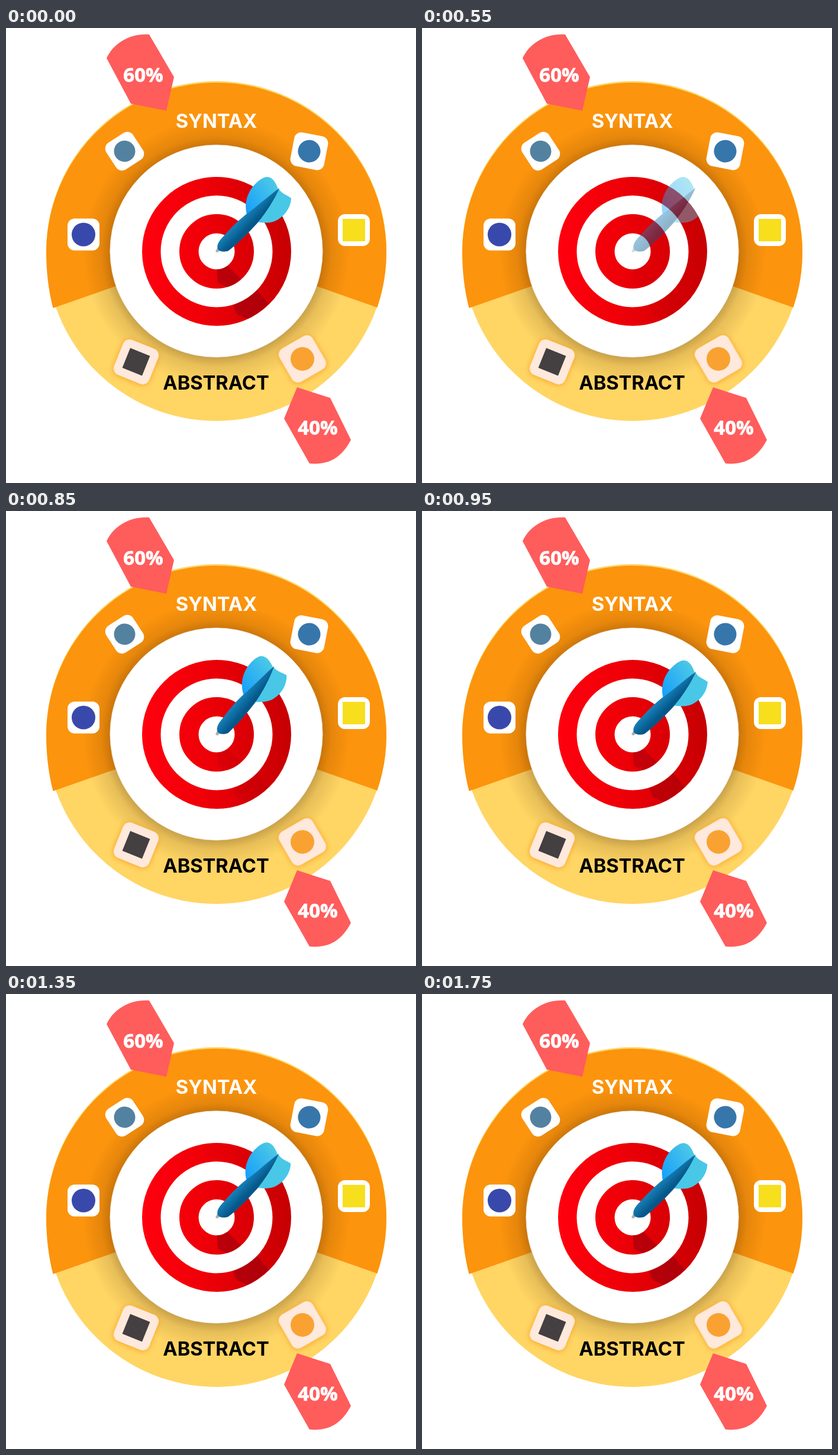
An HTML page for the animation above (1800 ms loop, 693 by 770 pixels).

```html
<!DOCTYPE html>
<html lang="en">
<head>
<meta charset="utf-8">
<title>Syntax and abstract</title>
<style>
  html, body { margin: 0; width: 100%; height: 100%; overflow: hidden; background: #fff; }
  svg { display: block; width: 693px; height: 770px; }
  text { font: 700 32.7px Inter, sans-serif; text-anchor: middle; }
  .share text { font: 700 33px "Open Sans", sans-serif; fill: #fff; stroke: #fff; stroke-width: .8; }
  .share path { fill: #ff5c5c; }
  .glow { fill: #fee9dc; filter: drop-shadow(0 1px 5px #f9a01e); }
</style>
</head>
<body>
<svg viewBox="0 0 693 770">
  <defs>
    <linearGradient id="red" gradientUnits="userSpaceOnUse" x1="230" y1="0" x2="482" y2="0">
      <stop stop-color="#ff000e"/><stop offset=".4" stop-color="#f00008"/><stop offset="1" stop-color="#c60002"/>
    </linearGradient>
    <radialGradient id="shade" gradientUnits="userSpaceOnUse" cx="355.5" cy="379" r="226">
      <stop offset=".79" stop-color="#421f00" stop-opacity=".28"/>
      <stop offset=".86" stop-color="#421f00" stop-opacity=".12"/>
      <stop offset="1" stop-color="#421f00" stop-opacity="0"/>
    </radialGradient>
    <linearGradient id="fin" gradientUnits="userSpaceOnUse" x1="50" y1="-70" x2="104" y2="-106">
      <stop stop-color="#18a0fa"/><stop offset="1" stop-color="#4bc8e6"/>
    </linearGradient>
    <linearGradient id="body" gradientUnits="userSpaceOnUse" x1="30" y1="-52" x2="48" y2="-34">
      <stop stop-color="#1c8cc6"/><stop offset="1" stop-color="#055789"/>
    </linearGradient>
    <clipPath id="window"><rect x="176" y="198" width="360" height="360"/></clipPath>
    <clipPath id="disk"><circle r="126"/></clipPath>
    <clipPath id="rings">
      <path clip-rule="evenodd" d="M230 378a126 126 0 0 0 252 0a126 126 0 0 0-252 0M261.500 378a94.500 94.500 0 0 0 189 0a94.500 94.500 0 0 0-189 0M293 378a63 63 0 0 0 126 0a63 63 0 0 0-126 0M325.500 378a30.500 30.500 0 0 0 61 0a30.500 30.500 0 0 0-61 0"/>
    </clipPath>
  </defs>

  <circle cx="355.500" cy="377.500" r="287.500" fill="#ffd564"/>
  <path d="M355.500 377.500L79.500 474Q68 430 68 377.500A287.500 287.500 0 1 1 627.500 473Z" fill="#fc940d"/>
  <circle cx="355.500" cy="379" r="226" fill="url(#shade)"/>
  <circle cx="355.500" cy="377.500" r="179.700" fill="#fff" stroke="#e6e2de" stroke-width=".6"/>

  <g class="share">
    <path d="M170 51C182 25 210 9 242 11L284 83L271 140L211 128Z"/>
    <path d="M492 608L548 626L583 697C567 728 544 740 513 737L470 661Z"/>
    <text x="232" y="91">60%</text>
    <text x="527" y="688">40%</text>
  </g>
  <text x="355.500" y="169" fill="#fff">SYNTAX</text>
  <text x="355" y="612">ABSTRACT</text>
  <g id="tiles"></g>

  <g fill="none" stroke="url(#red)">
    <circle cx="356" cy="378" r="110.250" stroke-width="31.500"/>
    <circle cx="356" cy="378" r="46.750" stroke-width="32.500"/>
  </g>
  <g id="shadow" clip-path="url(#rings)" fill="#a3000d">
    <path d="M356 405L373 401L399 427L379 441L358 431Z" opacity=".65"/>
    <path d="M384 470L424 443L444 467L412 494L390 484Z" opacity=".7"/>
  </g>

  <g clip-path="url(#window)">
    <g id="dart">
      <path d="M-2 0L4-11L10-4L1 2Z" fill="#a9aeb4"/>
      <path d="M54-54C46-72 48-91 60-108C68-118 78-126 86-126C96-125 100-115 104-106Z" fill="url(#fin)"/>
      <path id="rear" d="M50-54L105-106C110-97 120-95 126-90C125-71 112-57 98-51C85-46 68-49 50-54Z" fill="#48c7e7"/>
      <path d="M106-107C100-92 85-67 69-48C51-28 34-12 20-1C12 2 4 0 2-4C-1-12 6-20 14-28C29-45 44-59 57-68C73-80 93-98 106-107Z" fill="url(#body)"/>
    </g>
  </g>
</svg>
<script>
const el = id => document.getElementById(id);

// x, y, size, turn, mark shape, mark size, colour, lower half
const tiles = [
  [200.5, 208.5, 54, -33, 'circle', 36, '#5382a1'],
  [512.5, 208.5, 58, 11, 'circle', 38, '#3776ab'],
  [131, 349.5, 54, 0, 'circle', 40, '#3949ab'],
  [588, 342, 54, 0, 'square', 38, '#f7df1e'],
  [220, 565, 64, 22, 'square', 36, '#443f40', true],
  [501, 560, 65, -30, 'circle', 40, '#f9a232', true],
];
const box = (size, r, look) =>
  `<rect x="${-size / 2}" y="${-size / 2}" width="${size}" height="${size}" rx="${r}" ${look}/>`;
el('tiles').innerHTML = tiles.map(([x, y, size, turn, shape, mark, colour, low]) =>
  `<g transform="translate(${x} ${y}) rotate(${turn})">` +
  box(size, 12, low ? 'class="glow"' : 'fill="#fff"') +
  box(mark, shape === 'circle' ? mark / 2 : 0, `fill="${colour}"`) + '</g>').join('');

const LOOP = 1800, STEP = 50, HIT = 800;
const clamp = v => Math.max(0, Math.min(1, v));

function wobble(t) {
  const s = t - 1140;
  return -2.5 * Math.exp(-s / 320) * Math.cos(s / 260 * 2 * Math.PI);
}

function draw(now) {
  const t = Math.floor(now % LOOP / STEP) * STEP;
  const leaving = t < 620;
  const left = leaving ? 0 : Math.max(0, (HIT - t) / STEP);
  const turn = leaving ? 0 : left ? 16 * Math.min(left, 1) : wobble(t);
  el('dart').setAttribute('transform',
    `translate(${356 + 87 * left} ${378 - 53 * left}) rotate(${turn})`);
  el('dart').setAttribute('opacity', leaving ? clamp(1 - (t - 450) / 180) : 1);
  el('rear').setAttribute('clip-path', leaving && t >= 500 ? 'url(#disk)' : 'none');
  el('shadow').setAttribute('opacity',
    leaving ? clamp(1 - (t - 100) / 520) : clamp((t - HIT) / 200));
}

const start = performance.now();
function tick() {
  draw(performance.now() - start);
  requestAnimationFrame(tick);
}
tick();
</script>
</body>
</html>
```
